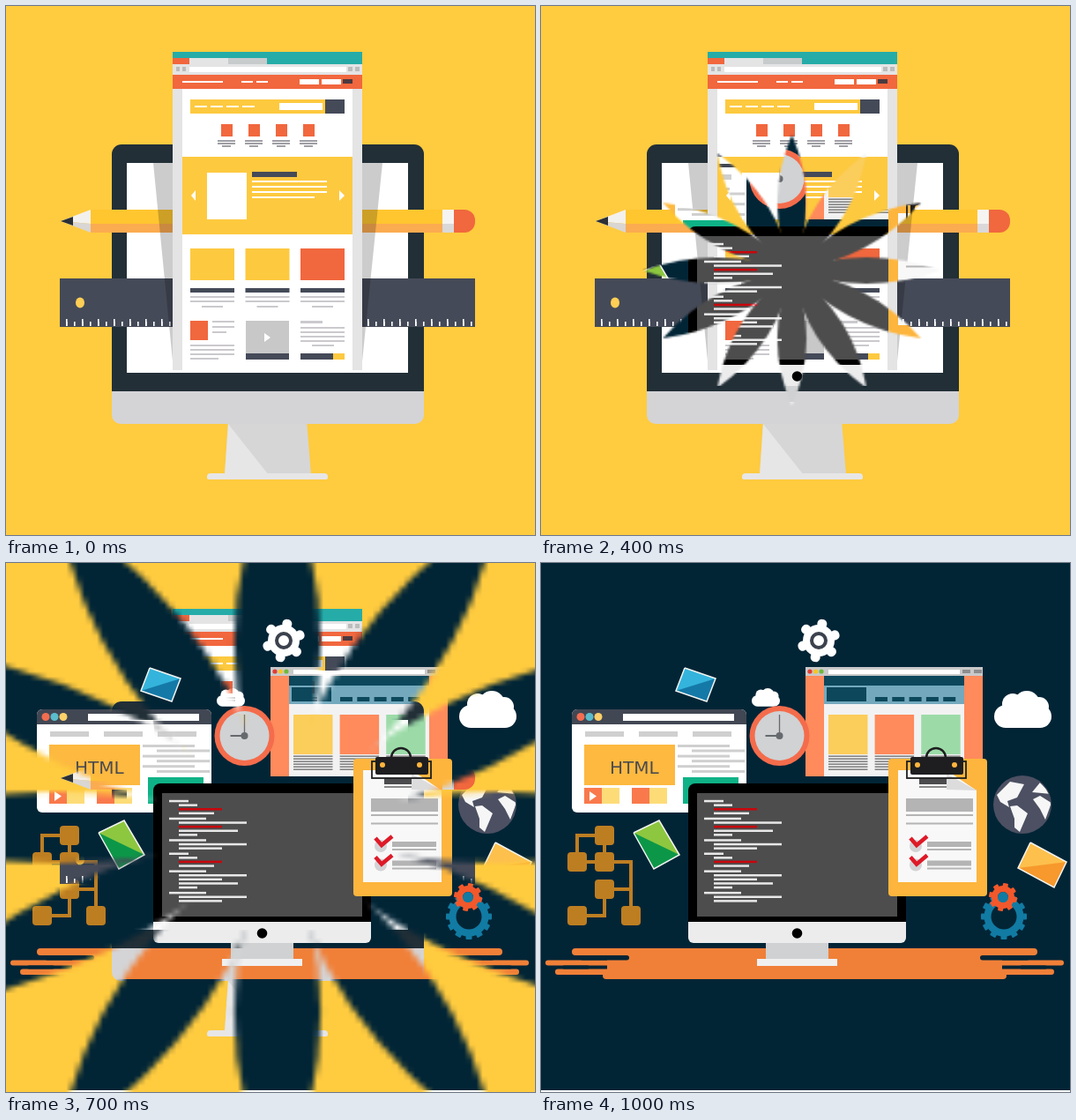
Recreate the animation shown at these times as an HTML page with a canvas. Size 600 by 600 pixels, loop 1100 ms.

```html
<!DOCTYPE html>
<html lang="en">
<head>
<meta charset="utf-8">
<title>Web design</title>
<style>
html, body { margin: 0; width: 100%; height: 100%; overflow: hidden; background: #ffcb3f; }
canvas { display: block; width: 600px; height: 600px; }
</style>
</head>
<body>
<canvas id="stage" width="600" height="600"></canvas>
<script>
const SIZE = 600, STEP = 100, STEPS = 11;
let g;

function layer(size, paint) {
  const c = document.createElement('canvas');
  c.width = c.height = size;
  g = c.getContext('2d');
  if (paint) paint();
  return c;
}
function repeat(n, paint) {
  for (let i = 0; i < n; i++) paint(i);
}

// Boxes are given by their edges: left, top, right, bottom.
function box(color, l, t, r, b) {
  g.fillStyle = color;
  g.fillRect(l, t, r - l, b - t);
}
function round(color, l, t, r, b, radius) {
  g.fillStyle = color;
  g.beginPath();
  g.roundRect(l, t, r - l, b - t, radius);
  g.fill();
}
// Evenly spaced copies of one bar, downwards or across.
function rows(color, l, r, top, n = 1, pitch = 5, h = 2) {
  repeat(n, i => box(color, l, top + i * pitch, r, top + i * pitch + h));
}
function columns(color, left, w, t, b, n, pitch) {
  repeat(n, i => box(color, left + i * pitch, t, left + i * pitch + w, b));
}
function trace(pts) {
  g.beginPath();
  for (let i = 0; i < pts.length; i += 2) g.lineTo(pts[i], pts[i + 1]);
}
function poly(color, ...pts) {
  trace(pts);
  g.fillStyle = color;
  g.fill();
}
function line(color, width, ...pts) {
  trace(pts);
  g.strokeStyle = color;
  g.lineWidth = width;
  g.stroke();
}
function disc(color, x, y, rx, ry = rx) {
  g.fillStyle = color;
  g.beginPath();
  g.ellipse(x, y, rx, ry, 0, 0, 7);
  g.fill();
}
function ring(color, width, x, y, r) {
  g.strokeStyle = color;
  g.lineWidth = width;
  g.beginPath();
  g.arc(x, y, r, 0, 7);
  g.stroke();
}
// Triangle with a vertical base, pointing right for w > 0.
function arrow(x, y, w, h) {
  poly('#fff', x, y - h, x + w, y, x, y + h);
}
function cog(color, x, y, r, teeth, depth, width, turn, corner) {
  repeat(teeth, i => {
    g.save();
    g.translate(x, y);
    g.rotate(turn + i * 2 * Math.PI / teeth);
    round(color, -width / 2, -r - depth, width / 2, -r + 4, corner);
    g.restore();
  });
}

function display() {
  const pale = '#e7e6e6';
  poly('#d6d6d7', 252, 470, 341, 470, 346, 532, 248, 532);
  poly(pale, 252, 474, 298, 532, 248, 532);
  round(pale, 228, 530, 365, 537, [4, 4, 2, 2]);
  round('#d4d4d6', 120, 400, 474, 474, 10);
  round('#222f37', 120, 157, 474, 437, [11, 11, 0, 0]);
  box('#fff', 137, 178, 456, 416);
}

function pencil() {
  const top = 231, mid = 247, end = 257;
  poly('#f3f1ee', 62, 244, 96, top, 96, mid);
  poly('#d9d6d3', 62, 244, 96, mid, 96, end);
  poly('#2b3036', 62, 244, 76, 239, 76, 249);
  box('#ffc62f', 96, top, 495, mid);
  box('#fbab50', 96, mid, 495, end);
  box('#f6f4f2', 495, top, 508, mid);
  box('#dad8d8', 495, mid, 508, end);
  round('#f1673e', 508, top, 532, end, [0, 12, 12, 0]);
}

function ruler() {
  box('#454a58', 61, 309, 532, 364);
  disc('#ffcf55', 84, 336.5, 5, 6);
  columns('#fff', 68, 1.6, 358, 363, 52, 9);
  columns('#fff', 68, 1.6, 355, 363, 26, 18);
}

function page() {
  const dark = '#454a58', red = '#f1673e', gold = '#fdc93f', grey = '#cbc9cd';
  box('#e4e4e5', 189, 52, 404, 413);
  box('#fff', 200, 94, 393, 413);

  // Browser bars
  box('#25aca8', 189, 52, 404, 66);
  box(red, 189, 59, 208, 66);
  box('#e4e4e5', 208, 59, 252, 66);
  box('#c7cbcc', 252, 59, 296, 66);
  box('#fff', 208, 69, 386, 75);
  columns('#bcbcbd', 193, 4, 69, 74, 2, 7);
  columns('#bcbcbd', 388, 5, 69, 74, 2, 8);
  box(red, 189, 78, 404, 94);
  rows('#fff', 200, 246, 85);
  columns('#fff', 267, 13, 85, 87, 2, 17);
  columns('#fff', 333, 22, 83, 89, 2, 25);
  box('#4b3a40', 382, 83, 393, 88);

  // Menu and icons
  box(gold, 209, 106, 362, 122);
  box(dark, 362, 106, 384, 122);
  box('#fff', 310, 110, 359, 118);
  columns('#fff', 214, 14, 113, 115, 4, 18);
  columns(red, 244, 13, 134, 148, 4, 31);
  columns('#a09fa5', 240, 20, 152, 154, 4, 31);
  columns('#a09fa5', 240, 20, 155, 157, 4, 31);
  columns('#a09fa5', 245, 10, 158, 160, 4, 31);

  // Banner
  box(gold, 200, 171, 393, 259);
  box('#fff', 228, 189, 273, 242);
  box(dark, 279, 188, 330, 194);
  rows('#fff', 279, 364, 198, 3, 6);
  rows('#fff', 279, 350, 216);
  arrow(215, 215, -5, 6);
  arrow(378, 215, 6, 6);

  // Three columns of cards
  repeat(3, i => {
    const x = 209 + i * 62.5;
    box(i < 2 ? gold : red, x, 275, x + 50, 311);
    rows(dark, x, x + 50, 320, 1, 0, 5);
    rows(grey, x, x + 50, 329, 2);
    rows(grey, x + 13, x + 37, 340);
  });
  box(red, 209, 357, 229, 379);
  rows(grey, 234, 259, 357, 2, 6);
  rows(grey, 234, 250, 369);
  rows(grey, 209, 259, 384, 3);
  rows(grey, 209, 241, 399);
  box('#c8c8c9', 272, 357, 321, 394);
  arrow(293, 376, 7, 5);
  columns(dark, 272, 49, 394, 401, 2, 62);
  box(gold, 371, 394, 384, 401);
  rows(grey, 334, 359, 357, 1, 0, 3);
  rows(grey, 334, 384, 364, 4);
  rows(grey, 347, 372, 384);
}

function poster() {
  const shade = 'rgba(0,0,0,.2)';
  box('#ffcb3f', 0, 0, SIZE, SIZE);
  display();
  pencil();
  ruler();
  poly(shade, 167, 178, 190, 178, 190, 413);
  poly(shade, 427, 178, 403, 178, 403, 413);
  page();
}

function cloud(x, y, w) {
  g.save();
  g.translate(x, y);
  g.scale(w / 65, w / 65);
  round('#fff', 0, 16, 65, 42, 13);
  disc('#fff', 21, 15, 12);
  disc('#fff', 37, 15, 15);
  disc('#fff', 51, 18, 11);
  g.restore();
}

// Folded card: the lighter flap spans the first two corners and a third one.
function card(light, deep, pts, corner) {
  poly(deep, ...pts);
  poly(light, ...pts.slice(0, 4), ...pts.slice(corner * 2, corner * 2 + 2));
  line('#f2f4f1', 1.5, ...pts, pts[0], pts[1]);
}

function codeWindow() {
  const pale = '#cfcfcf';
  round('#fff', 35, 166, 233, 283, 6);
  round('#414753', 35, 166, 233, 183, [6, 6, 0, 0]);
  ['#f36d50', '#5bbccb', '#fdd06a'].forEach((color, i) => disc(color, 45 + i * 10, 174.5, 4.5));
  box('#fff', 93, 171, 219, 179);
  columns(pale, 50, 44, 191, 197, 3, 61);
  box('#fdb940', 49, 206, 152, 252);
  g.fillStyle = '#4b4b4f';
  g.font = '20px "DejaVu Sans", sans-serif';
  g.fillText('HTML', 78, 238.5);
  rows(pale, 155, 214, 206, 3, 11.6, 3);
  rows(pale, 171, 231, 211.5, 3, 11.7, 3);
  box('#0fb286', 161, 243, 224, 273);
  columns('#f9794c', 49, 20, 255, 273, 2, 54);
  columns('#fddc78', 69, 20, 255, 273, 2, 54);
  arrow(55, 264.5, 8, 5.5);
}

function siteWindow() {
  const teal = '#0c475c', coral = '#ff8a5b';
  box('#f2f2f2', 300, 118, 501, 242);
  box('#c9c9ca', 300, 118, 501, 128);
  ['#e23c33', '#f6c624', '#70b83c'].forEach((color, i) => disc(color, 305 + i * 6.5, 123, 2.6));
  box('#fff', 326, 121, 475, 126);
  columns('#8d8d8f', 478, 9, 121, 125, 2, 13);
  columns(coral, 300, 21, 128, 242, 2, 180);
  box(teal, 321, 128, 480, 139);
  box('#74a9bd', 321, 139, 480, 160);
  box(teal, 324, 141, 369, 157);
  columns(teal, 379, 14, 152, 157, 5, 19.3);
  ['#fbcd5b', coral, '#9cdba8'].forEach((color, i) => {
    const x = 326 + i * 52.6;
    box(color, x, 172, x + 44.5, 217);
    rows('#6b6b6b', x, x + 44.5, 218.5, 6, 3, 1.3);
  });
}

function clock(x, y) {
  const hand = '#66696d';
  disc('#f46c4b', x, y, 34);
  disc('#d0d2d4', x, y, 28);
  line(hand, 1.3, x, y - 24, x, y);
  line(hand, 2, x - 16, y, x, y);
  disc(hand, x, y, 4);
}

function clipboard() {
  const ink = '#1e1e20', grey = '#b4b4b5', amber = '#fdb53d';
  round(amber, 394, 222, 506, 378, 4);
  poly('#f8f8f8', 405, 235, 460, 235, 494, 258, 494, 362, 405, 362);
  poly('#dcdcdd', 460, 239, 494, 258, 460, 257);
  box('#4c4c4e', 429, 244, 460, 251);
  rows('#8b8b8d', 429, 460, 253);
  g.strokeStyle = ink;
  g.lineWidth = 1.8;
  g.strokeRect(415, 225, 67, 19);
  round(ink, 419, 220, 479, 240, 2);
  g.lineWidth = 2.5;
  g.beginPath();
  g.arc(448, 221, 11, Math.PI, 0);
  g.stroke();
  disc(amber, 427, 229, 3);
  disc(amber, 469, 229, 3);
  box(grey, 414, 267, 490, 282);
  rows(grey, 414, 490, 285, 2, 9.5);
  repeat(2, i => {
    const y = 310 + i * 21.5;
    disc('#d3d3d6', 425, y + 11, 7);
    line('#de1a28', 4.5, 419, y + 2, 426, y + 10, 438, y);
    box(grey, 438, y + 6, 488, y + 12);
    rows(grey, 438, 488, y + 14);
  });
}

function globe() {
  const land = '#f6f6f7';
  disc('#4c5062', 546, 274, 33);
  g.save();
  g.beginPath();
  g.arc(546, 274, 32, 0, 7);
  g.clip();
  poly(land, 517, 263, 532, 248, 548, 251, 540, 266, 529, 270, 531, 277, 521, 271);
  poly(land, 532, 276, 540, 275, 552, 284, 543, 305, 537, 300, 537, 290);
  poly(land, 557, 260, 566, 249, 578, 262, 568, 261);
  poly(land, 558, 268, 566, 264, 579, 272, 572, 291, 566, 279);
  g.restore();
}

function flowchart() {
  const tan = '#bd7e22', [a, b, c] = [41, 72, 102], [p, q, r, s] = [309, 339, 370, 400];
  line(tan, 4, b, q, b, p, a, p, a, q, c, q, c, s);
  line(tan, 4, c, r, b, r, b, s, a, s);
  for (const [x, y] of [[b, p], [a, q], [b, q], [b, r], [a, s], [c, s]])
    round(tan, x - 11, y - 11, x + 11, y + 11, 4);
}

function desk(back) {
  const wood = '#f08038', mid = 299;
  const bar = (color, half, t, b) => round(color, mid - half, t, mid + half, b, (b - t) / 2);
  bar(wood, 264, 437, 445);
  bar(wood, 294, 450.5, 456.5);
  bar(wood, 283, 460.5, 467);
  bar(wood, 229, 464, 472);
  box(wood, 75, 441, 523, 467);
  // Notches cut in from both ends
  for (const side of [-1, 1]) {
    round(back, mid + side * 199, 445, mid + side * 255, 450.5, 3);
    round(back, mid + side * 244, 456.5, mid + side * 275, 460.5, 2);
  }
}

function computer() {
  box('#cfd1d2', 255, 430, 326, 449);
  box('#f0f0f1', 245, 449, 336, 457);
  round('#ececed', 167, 390, 414, 431, 6);
  round('#000', 167, 250, 414, 407, [8, 8, 0, 0]);
  box('#4d4d4d', 177, 261, 404, 401);
  disc('#000', 290.5, 420, 5.8);

  // Two kinds of code block; the third line of the fuller blocks is red.
  const short = [207, 217, 245, 236], long = [227, 273, 245, 263, 217];
  let y = 268.8;
  repeat(6, n => {
    const block = [short, long, long.slice(0, 3)][n % 3];
    block.forEach((end, i) => {
      const red = i === 2 && block.length > 3 && n < 4;
      rows(red ? '#c8060c' : '#e8e8e8', i ? 196 : 185, end, y, 1, 0, 2.5);
      y += 4.6;
    });
    y += 1.5;
  });
}

function gears() {
  const white = '#fff', blue = '#117ba3', red = '#f2582b';
  cog(white, 315, 88, 18, 6, 6.5, 11, .2, 5);
  disc(white, 315, 88, 18);
  ring('#3c424d', 4, 315, 88, 8);
  cog(blue, 525, 401, 21, 12, 5, 7, 0, 1);
  ring(blue, 8, 525, 401, 18.5);
  cog(red, 524, 379, 12, 8, 4, 6, .2, 1);
  ring(red, 7, 524, 379, 9.5);
  disc(blue, 524, 379, 6);
}

function workspace() {
  const back = '#022536';
  box(back, 0, 0, SIZE, SIZE);
  card('#34b4dc', '#1579a8', [163, 119, 198, 131, 188, 157, 153, 145], 3);
  card('#8dc73f', '#0c9748', [105, 306, 134, 292, 157, 331, 128, 347], 2);
  card('#fdc04d', '#f7992c', [555, 317, 596, 339, 582, 368, 541, 346], 3);
  cloud(239, 142, 32);
  cloud(514, 145, 65);
  codeWindow();
  siteWindow();
  clock(270.5, 196);
  flowchart();
  desk(back);
  computer();
  clipboard();
  globe();
  gears();
  box('#fff', 0, 598, SIZE, SIZE);
}

// Twelve-petalled mask, kept small so that scaling softens its edges.
const PETAL = 72, MASK = 160;
function flower() {
  g.translate(MASK / 2, MASK / 2);
  repeat(12, () => {
    g.beginPath();
    g.moveTo(0, 0);
    g.quadraticCurveTo(PETAL / 2, PETAL * .196, PETAL, 0);
    g.quadraticCurveTo(PETAL / 2, PETAL * -.196, 0, 0);
    g.fill();
    g.rotate(Math.PI / 6);
  });
  disc('#000', 0, 0, PETAL * .28);
}

const before = layer(SIZE, poster);
const after = layer(SIZE, workspace);
const mask = layer(MASK, flower);
const mix = layer(SIZE);
const mixer = mix.getContext('2d');
const stage = document.getElementById('stage').getContext('2d');

// The flower grows ever faster, widens and drifts sideways.
function bloom(k) {
  const t = k - 2;
  const ry = 87 * Math.exp(.28 * t + .00135 * t ** 3);
  const rx = ry * (1.05 + .003 * k * k);
  const x = 296 + 12 * Math.sin(2 * Math.PI * (k - 5.3) / 6.5);
  const w = MASK * rx / PETAL, h = MASK * ry / PETAL;
  mixer.globalCompositeOperation = 'copy';
  mixer.imageSmoothingQuality = 'medium';
  mixer.drawImage(mask, x - w / 2, 300 - h / 2, w, h);
  mixer.globalCompositeOperation = 'source-in';
  mixer.drawImage(after, 0, 0);
  stage.drawImage(mix, 0, 0);
}

function draw(step) {
  const last = STEPS - 1;
  stage.drawImage(step === last ? after : before, 0, 0);
  if (step > 0 && step < last) bloom(step);
}

const start = performance.now();
function tick(now) {
  draw(Math.floor(Math.max(0, now - start) / STEP) % STEPS);
  requestAnimationFrame(tick);
}
draw(0);
requestAnimationFrame(tick);
</script>
</body>
</html>
```
